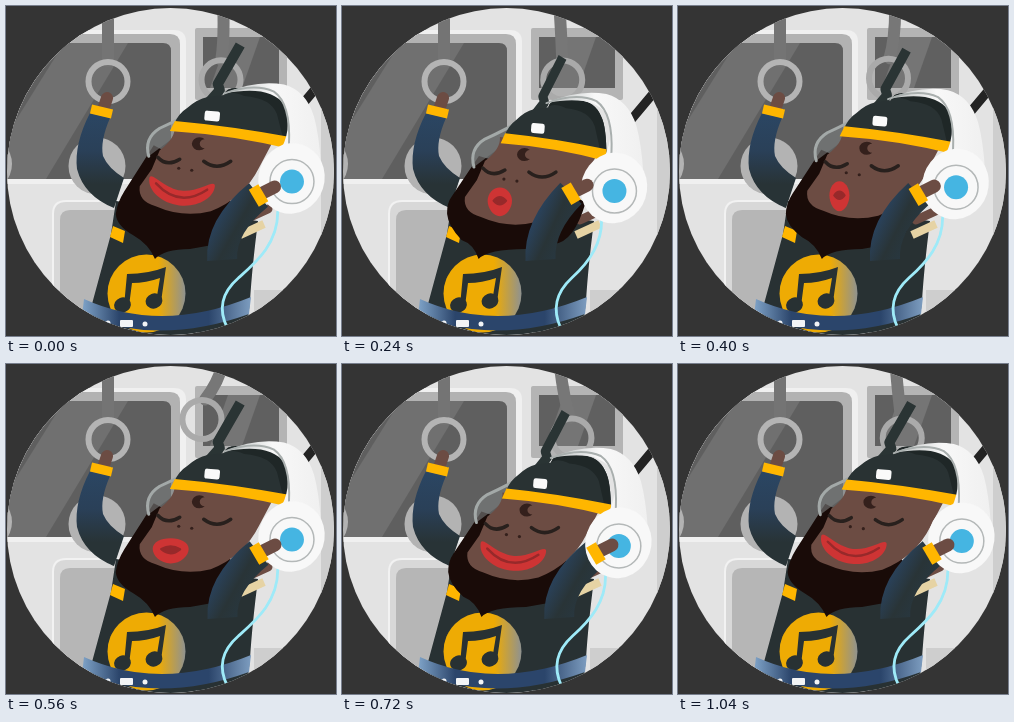
An HTML page that plays this animation: 330 by 330 pixels, repeating every 1120 ms.

```html
<!DOCTYPE html>
<html lang="en">
<head>
<meta charset="utf-8">
<title>Train groove</title>
<style>
  html, body { margin: 0; width: 100%; height: 100%; overflow: hidden; background: #343434; }
  svg { display: block; width: 100vw; height: 100vh; }
</style>
</head>
<body>
<svg viewBox="0 0 330 330">
  <defs>
    <clipPath id="porthole"><circle cx="164.5" cy="165.5" r="163.5"/></clipPath>
    <linearGradient id="sleeve" x1="0" y1="0" x2="1" y2="1">
      <stop offset="0" stop-color="#2a4666"/><stop offset=".45" stop-color="#293437"/>
      <stop offset="1" stop-color="#273a48"/>
    </linearGradient>
    <linearGradient id="leftSleeve" x1="0" y1="0" x2="0" y2="1">
      <stop offset="0" stop-color="#2b4663"/><stop offset=".4" stop-color="#2a4058"/>
      <stop offset=".75" stop-color="#283336"/>
    </linearGradient>
    <linearGradient id="badge">
      <stop offset=".65" stop-color="#eeab04"/><stop offset="1" stop-color="#8f9290"/>
    </linearGradient>
    <linearGradient id="belt">
      <stop offset="0" stop-color="#7fa3c8"/><stop offset=".22" stop-color="#2b456b"/>
      <stop offset=".75" stop-color="#2b456b"/><stop offset="1" stop-color="#7d9dc0"/>
    </linearGradient>
    <linearGradient id="shell">
      <stop offset="0" stop-color="#b9bebe"/><stop offset=".5" stop-color="#f8f8f8"/>
      <stop offset="1" stop-color="#f0f0f0"/>
    </linearGradient>
  </defs>

  <rect width="330" height="330" fill="#343434"/>
  <g clip-path="url(#porthole)" stroke-linecap="round" stroke-linejoin="round">
    <!-- carriage -->
    <rect width="330" height="330" fill="#e3e3e3"/>
    <path d="M0 24H168Q180 24 180 36V178H0Z" fill="#f0f0f0"/>
    <path d="M0 28H164Q174 28 174 38V173H0Z" fill="#b2b2b2"/>
    <path d="M0 37H157Q165 37 165 45V173H0Z" fill="#5f5f5f"/>
    <path d="M58 37H122L40 173H0V130Z" fill="#707070"/>
    <path d="M47 330V208Q47 195 60 195H190V330Z" fill="#d8d8d8" stroke="#f2f2f2" stroke-width="2"/>
    <path d="M54 330V214Q54 204 64 204H190V330Z" fill="#b6b6b6"/>
    <circle cx="91" cy="160" r="28.5" fill="#b3b3b3"/>
    <circle cx="-22" cy="158" r="28" fill="#b3b3b3"/>
    <rect x="189" y="22" width="92" height="72" rx="2" fill="#b4b4b4"/>
    <rect x="197" y="31" width="76" height="51" fill="#606060"/>
    <path d="M222 31H254L236 82H204Z" fill="#757575"/>
    <path d="M315 40H330V330H248V284H315Z" fill="#cecece"/>

    <g fill="none">
      <path id="strap" stroke="#777" stroke-width="12"/>
      <circle id="ring" r="19.5" stroke="#aaa" stroke-width="6"/>
      <path d="M102 -5V55" stroke="#747474" stroke-width="12"/>
      <circle cx="102" cy="75.5" r="19.5" stroke="#b4b4b4" stroke-width="6"/>
    </g>

    <!-- torso -->
    <path d="M110 195L105 228L86 298L84 330H240L244 295Q246 262 252 215Z" fill="#283133"/>
    <path d="M107 220L119 225L117 237L104 231Z" fill="#ffb600"/>
    <path d="M238 214L262 203" stroke="#6c4c43" stroke-width="9"/>
    <path d="M234 229L258 218" stroke="#e6d3a4" stroke-width="8" stroke-linecap="butt"/>
    <circle cx="140.5" cy="287.5" r="39" fill="url(#badge)"/>
    <g fill="#283133">
      <path d="M121 268Q142 268 160 261L155 296H150L154 272Q140 277 126 277L123 300H118Z"/>
      <ellipse cx="116.5" cy="299" rx="8.5" ry="7.5" transform="rotate(-20 116.5 299)"/>
      <ellipse cx="148" cy="295" rx="8.5" ry="7.5" transform="rotate(-20 148 295)"/>
    </g>
    <path d="M78 293Q155 328 245 291L243 308Q155 340 76 310Z" fill="url(#belt)"/>
    <rect x="114" y="314" width="13" height="7" rx="1" fill="#f2f4f6"/>
    <circle cx="102" cy="317" r="2.5" fill="#f2f4f6"/>
    <circle cx="139" cy="318" r="2.5" fill="#f2f4f6"/>

    <!-- raised arm -->
    <path d="M98 101L101 92" stroke="#6c4c43" stroke-width="12"/>
    <path d="M84 107L104 112Q94 135 97 150Q102 162 118 172L108 202Q78 190 71 163Q68 138 84 107Z" fill="url(#leftSleeve)"/>
    <path d="M85 103L106 108" stroke="#ffb600" stroke-width="9" stroke-linecap="butt"/>

    <!-- head -->
    <path id="backHook" d="M276 99L285 113L311 82" fill="none" stroke="#232323" stroke-width="9" stroke-linecap="butt"/>
    <path id="beard" fill="#190b08"/>
    <g id="head">
      <path d="M141 152Q136 134 152 124Q172 115 202 98V112L165 134Z" fill="#7a7d7d" fill-opacity=".6"/>
      <path d="M141 152Q136 134 152 124Q172 115 202 98" fill="none" stroke="#a3a9a8" stroke-width="3"/>
      <path d="M167 122Q168 134 152 146L144 165L132 182Q130 197 148 202Q175 214 203 207Q236 194 251 164L268 132Z" fill="#6c4c43"/>
      <path d="M150 153Q159 163 172 155M196 157Q209 167 223 157" fill="none" stroke="#28201d" stroke-width="3.5"/>
      <path d="M197 135A7.5 6.5 0 1 0 197 144A5 4.5 0 1 1 197 135Z" fill="#34201c"/>
      <circle cx="171" cy="164" r="1.6" fill="#34201c"/>
      <circle cx="184" cy="166" r="1.6" fill="#34201c"/>
    </g>
    <g id="mouth">
      <path id="lips" fill="#ce3434"/>
      <path id="lipLine" stroke="#97292a" stroke-width="2.5"/>
    </g>
    <path id="forearm" fill="none" stroke="url(#sleeve)" stroke-width="30" stroke-linecap="butt"/>
    <g id="cap">
      <path d="M232 41L210 80L212 86L199 101" fill="none" stroke="#2a3434" stroke-width="10" stroke-linecap="butt"/>
      <path d="M167 120Q172 109 180 104Q190 95 200 93L216 91Q218 84 228 84L250 84Q268 85 275 100Q281 110 281 141Z" fill="#293233"/>
      <path d="M216 91Q222 86 236 92Q262 94 268 110L275 138L281 140Q281 110 275 100Q268 85 250 84H228Q218 84 216 91Z" fill="#1f2727"/>
      <path d="M168 117Q222 122 281 133V145Q224 131 163 127Z" fill="#ffb600"/>
      <rect x="197" y="107" width="15" height="10" rx="2.5" fill="#fafafa" transform="rotate(5 204 112)"/>
    </g>
    <path id="cord" fill="none" stroke="#9eeaf8" stroke-width="2.8"/>
    <g id="phones">
      <path d="M216 89Q248 75 276 80Q298 86 306 112Q311 130 313 160L270 150Q286 125 276 100Q262 80 216 89Z" fill="url(#shell)"/>
      <path d="M216 89Q246 78 266 87Q283 99 281 140" fill="none" stroke="#a9afae" stroke-width="2"/>
      <ellipse cx="283.5" cy="174" rx="33" ry="35.5" fill="#f8f8f8" transform="rotate(18 284 174)"/>
      <circle cx="284" cy="177" r="22" fill="none" stroke="#b4b8b8" stroke-width="1.5"/>
      <circle cx="284" cy="177" r="12" fill="#45b5e2"/>
    </g>

    <!-- hand on the headphones -->
    <g id="hand">
      <path d="M255 187L267 181" stroke="#6c4c43" stroke-width="13"/>
      <path d="M246 181L256 198" stroke="#ffb600" stroke-width="11" stroke-linecap="butt"/>
    </g>
  </g>
</svg>
<script>
const STEP = 80;
const COUNT = 14;
const BEAT = 7;

const el = id => document.getElementById(id);
const path = (id, d) => el(id).setAttribute('d', d);
const transform = (id, value) => el(id).setAttribute('transform', value);
const move = (id, x, y) => transform(id, `translate(${x} ${y})`);
const clamp = (v, lo, hi) => Math.min(hi, Math.max(lo, v));
const mix = (a, b, t) => a + (b - a) * t;
const wave = (i, peak) => Math.cos(2 * Math.PI * (i - peak) / BEAT);

// mood: 1 = grin, 0 = wide pout, -1 = narrow pout
function drawMouth(mood, k) {
  const grin = Math.max(0, mood);
  const pucker = Math.max(0, -mood);
  const w = mix(17, 33, grin) - pucker * 7;
  const h = 12 + pucker * 2;
  const corner = mix(0, -9, grin);
  const top = mix(-h, -1, grin);
  const up = corner - mix(h * .55, 9, grin);
  const down = corner + mix(h * .55, 12, grin);
  path('lips', `M${-w} ${corner}
    C${-w} ${up} ${-w * .55} ${top} 0 ${top}
    C${w * .55} ${top} ${w} ${up} ${w} ${corner}
    C${w} ${down} ${w * .55} ${h + 2} 0 ${h + 2}
    C${-w * .55} ${h + 2} ${-w} ${down} ${-w} ${corner}Z`);

  const inner = w * mix(.5, .78, grin);
  const edge = mix(0, -5, grin);
  path('lipLine', `M${-inner} ${edge}Q0 ${mix(7, 17, grin)} ${inner} ${edge}
    Q0 ${mix(-7, 17, grin)} ${-inner} ${edge}Z`);
  el('lipLine').setAttribute('fill', grin < .7 ? '#97292a' : 'none');
  transform('mouth', `translate(${mix(163, 174, grin) - 4 * k} ${187 + 6 * k}) rotate(${7 * grin})`);
}

function render(time) {
  const i = Math.floor(time / STEP) % COUNT;
  const k = .5 + .8 * wave(i, 3.1);
  const lag = .5 + .7 * wave(i, 3.4);
  const reach = 3 - 26 * Math.exp(-(((i - 3.4) / 2) ** 2));
  const mood = clamp((Math.abs(i - 4.4) - 2.5) / 1.6, -1, 1);

  move('head', -7 * k, 7 * k);
  transform('cap', `translate(${165 - 3.5 * k} ${8 * k}) scale(${1 - .08 * k} 1) translate(-165 0)`);
  move('phones', -10 * lag, 7 * lag);
  move('backHook', 2 * k, 2 * k);
  move('hand', reach, -Math.min(0, reach) * -.08);
  drawMouth(mood, k);

  path('beard', `M${146 - 7 * k} ${141 + 7 * k}
    L${117 - 6 * k} ${186 + 4 * k}Q${110 - 4 * k} 197 ${109 - 3 * k} 208
    Q${110 - 3 * k} 220 ${126 - 5 * k} ${230 + 3 * k}Q${141 - 7 * k} 238 ${147 - 8 * k} 253
    Q${156 - 8 * k} 243 184 243L212 238Q232 236 ${227 - .75 * reach} 197L205 170Z`);
  path('forearm', `M${215 + .75 * reach} 254
    Q${213 + .75 * reach} 220 ${251 + reach} ${189 + Math.min(0, reach) * .08}`);
  path('cord', `M${270 - 9 * lag} ${207 + 7 * lag}
    C${270 - 9 * lag} 238 ${250 - 2 * lag} 256 ${232 - 2 * lag} 272
    Q${207 - lag} 294 ${221 - 2 * lag} 322`);

  // the free strap is jolted once per loop and swings out
  const n = (i + BEAT) % COUNT;
  const sway = -2 - 19 * Math.exp(-.12 * n) * Math.cos(Math.PI * n / 2);
  const ringY = 74 - Math.max(0, -sway) ** 2 * .042;
  path('strap', `M217 -6Q${219 + sway * .15} ${ringY - 42} ${217 + sway * .85} ${ringY - 20}`);
  el('ring').setAttribute('cx', 217 + sway);
  el('ring').setAttribute('cy', ringY);
}

const start = performance.now();
function tick() {
  render(performance.now() - start);
  requestAnimationFrame(tick);
}
render(0);
requestAnimationFrame(tick);
</script>
</body>
</html>
```
